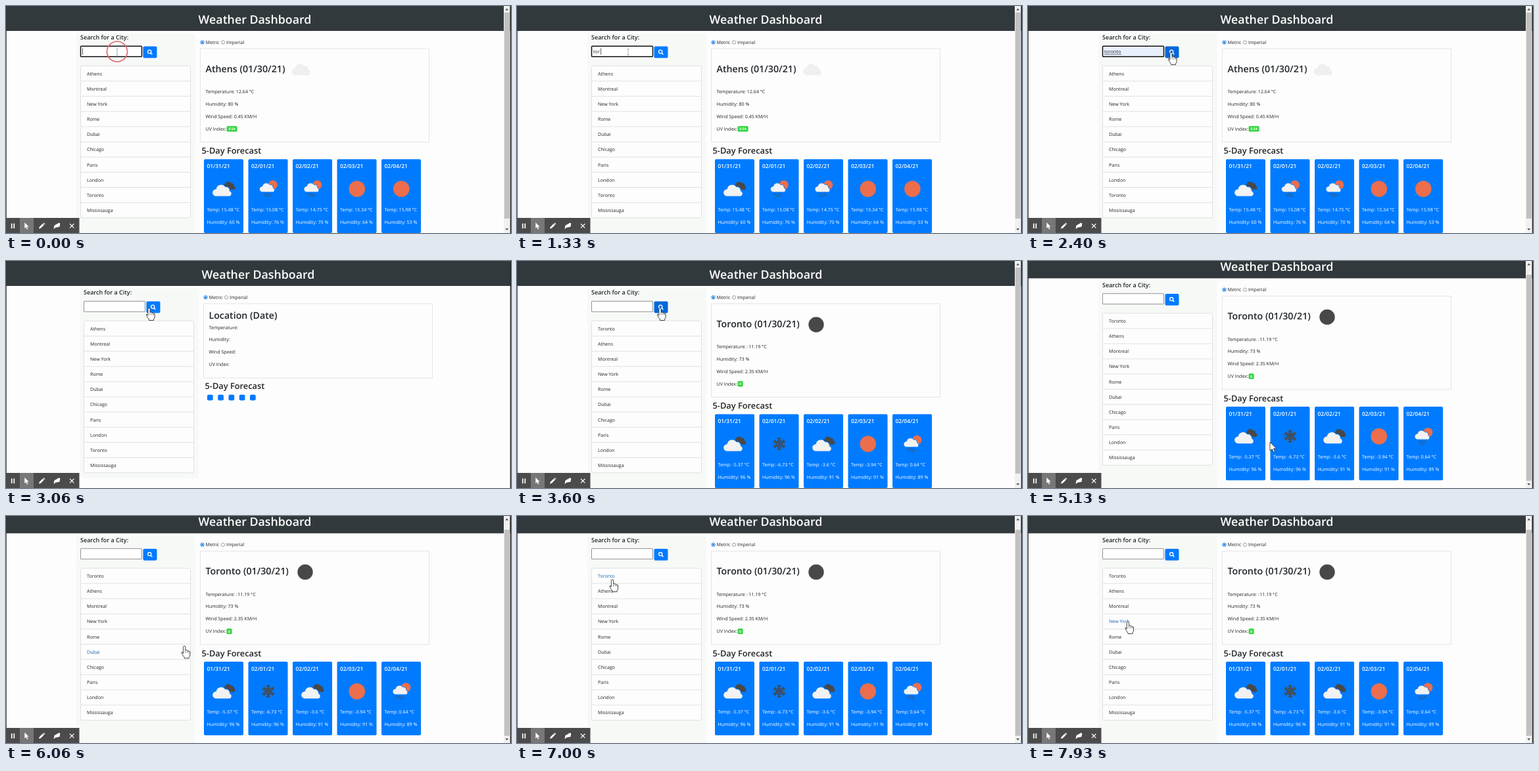
An HTML page for the animation above (8 s loop, 768 by 346 pixels).

```html
<!DOCTYPE html>
<html lang="en">
<head>
<meta charset="utf-8">
<title>Weather Dashboard</title>
<style>
  html, body { margin: 0; width: 100%; height: 100%; overflow: hidden; background: #fdfdfd; }
  svg { display: block; width: 100%; height: 100%; }
  text { font-family: "Open Sans", "Noto Sans", sans-serif; text-rendering: geometricPrecision; }
</style>
</head>
<body>
<svg id="stage" viewBox="0 0 768 346"></svg>
<script>
const LOOP = 8000, BLUE = '#007bff', INK = '#212529', DARK = '#484848', SUN = '#ec6e4c';
const BLANK = 3000, LOADED = 3530, ROW = 23.15;
const stage = document.getElementById('stage');

const cities = ['Athens', 'Montreal', 'New York', 'Rome', 'Dubai', 'Chicago', 'Paris', 'London', 'Toronto', 'Mississauga'];
const dates = ['01/31/21', '02/01/21', '02/02/21', '02/03/21', '02/04/21'];
const reports = {
  Athens: {
    now: ['12.64', 80, '0.45', '0.54'], icon: ['cloud', 449.5],
    days: [['clouds', '15.48', 60], ['rain', '15.08', 76], ['rain', '14.75', 70], ['sun', '15.34', 64], ['sun', '15.98', 53]]
  },
  Toronto: {
    now: ['-11.19', 73, '2.35', '0'], icon: ['night', 455],
    days: [['clouds', '-5.37', 96], ['snow', '-6.73', 96], ['clouds', '-3.6', 91], ['sun', '-3.94', 91], ['rain', '0.64', 89]]
  }
};

// [time, x, y] of the pointer tip
const path = [[0, 169, 70], [1800, 169, 70], [2350, 217.5, 71], [3000, 217.5, 72], [3600, 217.5, 72], [4400, 404, 174],
  [4520, 404, 174], [5050, 368, 276], [5400, 368, 276], [6850, 145, 97], [7150, 145, 97], [7880, 152, 161], [8000, 152, 161]];
// [time, text in the search box]
const typing = [[1060, 't'], [1200, 'to'], [1330, 'tor'], [1460, 'toro'], [1600, 'toron'], [1670, 'toront'], [1730, 'toronto']];

const clamp = v => Math.max(0, Math.min(1, v));
const smooth = v => v * v * (3 - 2 * v);
const rect = (x, y, w, h, fill, more = '') => `<rect x="${x}" y="${y}" width="${w}" height="${h}" fill="${fill}" ${more}/>`;
const circle = (x, y, r, fill, more = '') => `<circle cx="${x}" cy="${y}" r="${r}" fill="${fill}" ${more}/>`;
const line = (d, color, width, more = '') => `<path d="${d}" fill="none" stroke="${color}" stroke-width="${width}" ${more}/>`;
const text = (x, y, s, size = 7.1, fill = INK, weight = 400, more = '') =>
  `<text x="${x}" y="${y}" font-size="${size}" fill="${fill}" font-weight="${weight}" ${more}>${s}</text>`;
const group = (x, y, body) => `<g transform="translate(${x} ${y})">${body}</g>`;
const cloud = (x, y, k, fill, edge = 'none') =>
  `<path transform="translate(${x} ${y}) scale(${k})" fill="${fill}" stroke="${edge}"
    d="M-9 8.5a5.5 5.5 0 0 1-.5-11 7.5 7.5 0 0 1 13.5-3 5.5 5.5 0 0 1 6.5 6 4.3 4.3 0 0 1 0 8z"/>`;

const flakeArm = line('M0 0V-10M-2.8-9L0-6.4 2.8-9M-2.6-5.4L0-3 2.6-5.4', DARK, 1.5);
const icons = {
  cloud: cloud(0, 0, 1, '#efefef'),
  clouds: cloud(8, -5, .7, DARK) + cloud(-2, 2.5, 1.06, '#f2f2f2', BLUE),
  rain: circle(7, -6, 7, SUN) + cloud(-1.2, -2, .82, '#f2f2f2', BLUE) +
    line('M-6 7l-1 2M-2 6.5l-1 2M2 7l-1 2M-4 10l-.8 2M0 10l-.8 2M4 9.5l-.6 1.5', DARK, 1.3),
  sun: circle(0, 0, 12.3, SUN),
  night: circle(0, 0, 11.7, DARK),
  snow: [0, 60, 120, 180, 240, 300].map(a => `<g transform="rotate(${a})">${flakeArm}</g>`).join('')
};

const outline = 'fill="#fff" stroke="#333" stroke-width=".9" stroke-linejoin="round"';
const pointers = {
  beam: line('M-1.5-4.5H1.5M0-4.5V4.5M-1.5 4.5H1.5', '#777', .6),
  arrow: `<path ${outline} d="M0 0V13.5l3.2-2.9 2.2 5 2.2-1-2.2-4.7h4.4z"/>`,
  hand: `<path ${outline} d="M-1.6 1.4a1.6 1.6 0 0 1 3.2 0v5l1-.5q1.6 0 2 1 1.4-.5 2 .8 1.8-.2 2 1.3v4q0 2-1.6 4v1.5h-7v-1.5q-2-2.2-3.4-5.2-1-2.6-.6-2.6 1.4-.2 2.4 2z"/>` +
    line('M1.6 6.4v4M4.4 7v3.4M6.7 8v2.6', '#333', .6)
};

function pointerAt(t) {
  const i = Math.max(1, path.findIndex(p => p[0] > t));
  const [t0, x0, y0] = path[i - 1], [t1, x1, y1] = path[i];
  const k = smooth(clamp((t - t0) / (t1 - t0)));
  return [x0 + (x1 - x0) * k, y0 + (y1 - y0) * k];
}

function sidebar(t, list, overButton, overRow, blank) {
  const focus = t < BLANK, filled = t >= 1800 && focus;
  const typed = focus ? (typing.filter(k => k[0] <= t).pop() || [0, ''])[1] : '';
  const caretOn = focus && t < 1800 && (t < 600 || t >= 1000);
  const caretX = 116.5 + typed.length * 3.7;
  return rect(107, 42, 181, blank ? 289 : 316, '#f7f9f7') +
    text(113, 51.3, 'Search for a City:', 9, INK, 600) +
    rect(113.5, 61.3, 93, 16, filled ? '#e8f0fe' : '#fff', focus ? 'rx="1" stroke="#111" stroke-width="1.5"' : 'rx=".5" stroke="#858585" stroke-width=".9"') +
    text(116, 72, typed, 7.2) +
    (filled ? line('M116 73.7H142', INK, .6) : '') +
    (caretOn ? line(`M${caretX} 64.5V74`, '#111', .7) : '') +
    rect(208.5, 61.5, 21, 17.8, overButton ? '#0069d9' : BLUE, 'rx="2"') +
    circle(218.2, 69.7, 2.6, 'none', 'stroke="#fff" stroke-width="1.3"') +
    line('M220.2 71.7l2.2 2.2', '#fff', 1.5) +
    rect(113.5, 91.3, 167, ROW * 10, '#fdfdfd', 'rx="2" stroke="#dcdede" stroke-width=".9"') +
    list.map((city, i) => (i ? line(`M113.5 ${91.3 + ROW * i}h167`, '#dcdede', .9) : '') +
      text(123, 105.6 + ROW * i, city, 7.1, i === overRow ? '#1763b5' : INK)).join('');
}

function units() {
  return circle(298.5, 55.4, 2.7, '#fff', 'stroke="#0b74e8" stroke-width=".9"') + circle(298.5, 55.4, 1.5, '#0b74e8') +
    text(303.5, 58, 'Metric') + circle(330, 55.4, 2.6, '#fff', 'stroke="#777" stroke-width=".7"') + text(335, 58, 'Imperial');
}

const panel = h => rect(295.5, 65, 348, h, 'none', 'stroke="#e0e2e2" stroke-width=".9"');
const lines = (y, rows) => rows.map((s, i) => text(303.5, y + 18.8 * i, s)).join('');

function emptyReport() {
  return panel(113.3) + text(303.5, 87.6, 'Location (Date)', 14.2, INK, 600) +
    lines(103.6, ['Temperature:', 'Humidity:', 'Wind Speed:', 'UV Index:']) +
    text(297.5, 195.4, '5-Day Forecast', 12.8, INK, 600) +
    dates.map((d, i) => rect(301 + 16.25 * i, 203.8, 8.7, 8.8, BLUE, 'rx="2"')).join('');
}

function report(city) {
  const { now: [temp, humid, wind, uv], icon: [name, iconX], days } = reports[city];
  const badge = uv.length > 1 ? 16 : 8;
  const card = ([icon, deg, hum], i) => group(301 + 67.5 * i, 233.5,
    rect(0, 0, 60, 112.4, BLUE, 'rx="2"') + text(4.5, 13.8, dates[i], 8.4, '#fff', 600) +
    group(30.3, 45.3, icons[icon]) +
    text(4.5, 79.4, `Temp: ${deg} °C`, 7.1, '#fff') + text(4.5, 98.1, `Humidity: ${hum} %`, 7.1, '#fff'));
  return panel(142.5) + text(303.5, 100.5, `${city} (01/30/21)`, 14.25, INK, 600) +
    group(iconX, 97, icons[name]) +
    lines(133.3, [`Temperature: ${temp} °C`, `Humidity: ${humid} %`, `Wind Speed: ${wind} KM/H`, 'UV Index:']) +
    rect(335.6, 183, badge, 8.6, '#35d640', 'rx="1.6"') +
    text(335.6 + badge / 2, 189.3, uv, 5.2, '#fff', 700, 'text-anchor="middle"') +
    text(297.5, 225.2, '5-Day Forecast', 12.8, INK, 600) + days.map(card).join('');
}

function scrollbar(scroll) {
  return rect(757, 0, 9.5, 346, '#f1f1f1') + rect(757.8, 10 + scroll * .95, 8, 314, '#c1c1c1') +
    '<path fill="#555" d="M759.3 6.5l2.4-3 2.4 3zM759.3 339l2.4 3 2.4-3z"/>';
}

const toolbar = rect(0, 323, 111.5, 23, '#4b4b4b') + rect(21, 323, 21, 23, '#777') +
  line('M8.7 331.5v7.5M12.3 331.5v7.5', '#fff', 1.7) +
  '<path fill="#fff" d="M28.3 330v9l2.1-1.9 1.6 3.4 1.4-.7-1.6-3.2h2.9z"/>' +
  '<path fill="#fff" d="M50 339.6l.8-2.8 5-5 2 2-5 5zM56.4 331.2l1-1 2 2-1 1z"/>' +
  '<path fill="#fff" d="M72.5 340l1-5.5 7-4 1.8.7-.8 5.3-6.2 1.3z"/>' +
  line('M97 332l6.4 6.4M103.4 332l-6.4 6.4', '#fff', 1.2);

function ring(t, start, x, y) {
  const fade = 1 - clamp((t - start - 60) / 270);
  return t >= start && fade > 0 ? circle(x, y, 15.5, 'none', `stroke="#e06a6a" stroke-width="1.7" opacity="${fade.toFixed(2)}"`) : '';
}

function scene(t) {
  const blank = t >= BLANK && t < LOADED, city = t < BLANK ? 'Athens' : 'Toronto';
  const list = t < LOADED ? cities : ['Toronto', ...cities.filter(c => c !== 'Toronto')];
  const scroll = 11.6 * smooth(clamp((t - 4500) / 130));
  const [x, y] = pointerAt(t), pageY = y + scroll;
  const overButton = x > 208.5 && x < 229.5 && pageY > 61 && pageY < 79.5;
  const row = Math.floor((pageY - 91.3) / ROW);
  const overRow = x > 113 && x < 280.5 && row >= 0 && row < 10 ? row : -1;
  const overInput = x > 113 && x < 207 && pageY > 61 && pageY < 78;
  const pointer = overButton || overRow >= 0 ? 'hand' : overInput ? 'beam' : 'arrow';
  const page = rect(-10, -1, 790, 39, '#32393d') +
    text(378.5, 26.7, 'Weather Dashboard', 17.8, '#fff', 600, 'text-anchor="middle"') +
    sidebar(t, list, overButton && !blank, overRow, blank) + units() + (blank ? emptyReport() : report(city));
  return rect(0, 0, 768, 346, '#fdfdfd') + group(blank ? 5 : 0, -scroll, page) +
    (blank ? '' : scrollbar(scroll)) +
    rect(0, 0, .8, 346, '#333') + rect(766.7, 0, 1.3, 346, '#222') + toolbar +
    ring(t, 0, 169, 69.5) + ring(t, 2600, 218, 72) + group(x.toFixed(2), y.toFixed(2), pointers[pointer]);
}

let shown = '';
const start = performance.now();
function draw() {
  const next = scene((performance.now() - start) % LOOP);
  if (next !== shown) stage.innerHTML = shown = next;
  requestAnimationFrame(draw);
}
draw();
</script>
</body>
</html>
```
